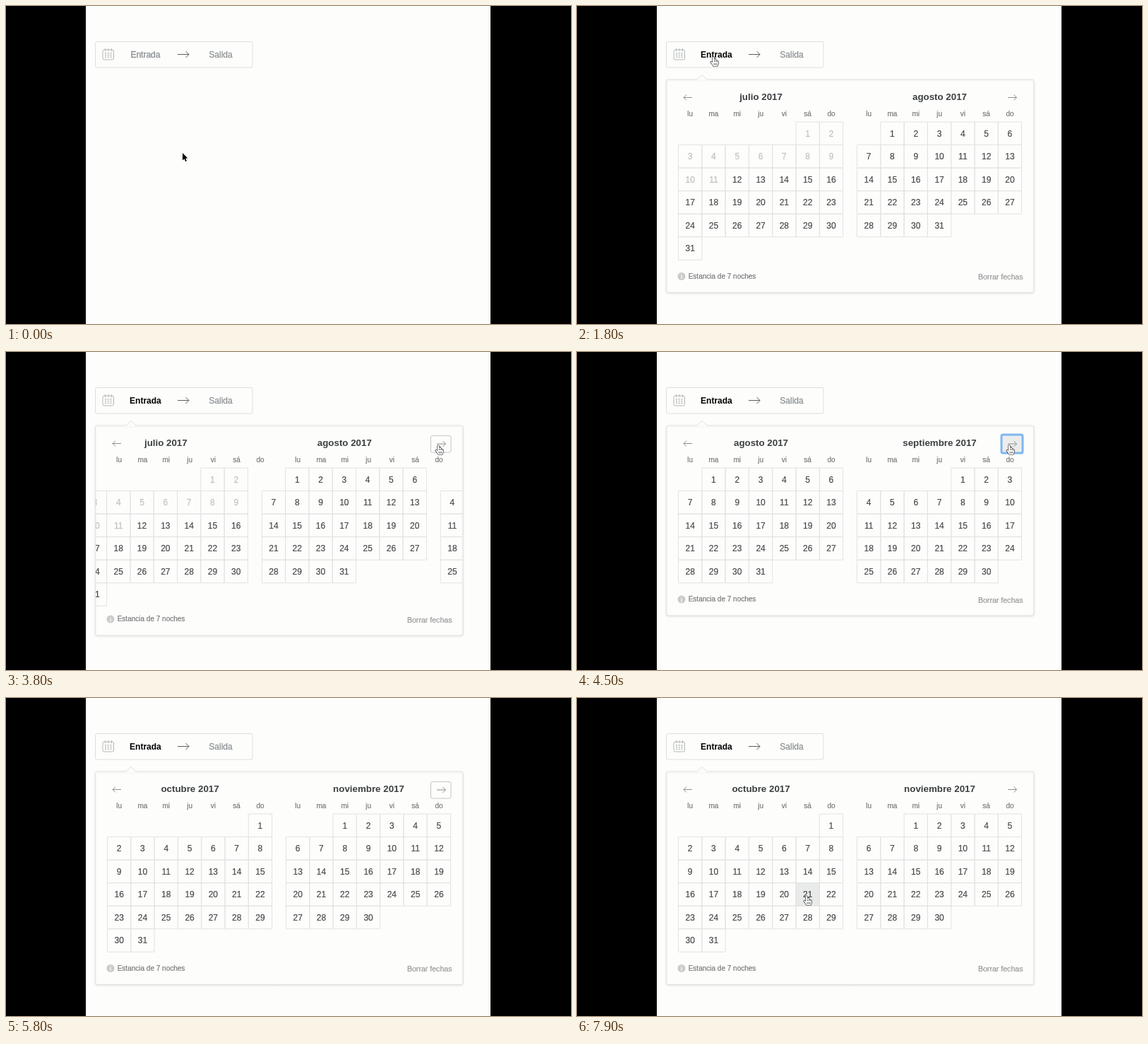
These frames come from a looping animation (800x450 px, 8000 ms). An HTML page with a canvas:

```html
<!DOCTYPE html>
<html lang="es">
<head>
<meta charset="utf-8">
<title>Selector de fechas</title>
<style>
html, body { margin: 0; width: 100%; height: 100%; overflow: hidden; background: #000; }
canvas { display: block; }
</style>
</head>
<body>
<canvas id="stage" width="800" height="450"></canvas>
<script>
const ctx = document.getElementById('stage').getContext('2d');
const LOOP = 8000, STEP = 100;
const PAPER = '#fdfefc', LINE = '#e1e3e2', INK = '#46494a';
const COL = 33.3, ROW = 32.55, TOP = 164, LEFT = 143.5, MONTH_GAP = 253;
const MONTHS = ['enero', 'febrero', 'marzo', 'abril', 'mayo', 'junio', 'julio',
  'agosto', 'septiembre', 'octubre', 'noviembre', 'diciembre'];
const WEEK = ['lu', 'ma', 'mi', 'ju', 'vi', 'sá', 'do'];
const TODAY = 12, FIRST = 6;
const CLICKS = [3700, 4500, 5400], SLIDES = [3740, 4540, 5540];

// Cursor paths: start, end, then three points of a quadratic curve.
const PATHS = [
  [0, 800, 250, 208, 150, 150, 193, 72],
  [1800, 2600, 193, 72, 330, 260, 560, 130],
  [2600, 3100, 560, 130, 590, 128, 612, 132],
  [6500, 7400, 612, 132, 400, 200, 226, 276],
  [7400, 7900, 226, 276, 270, 284, 325, 280]
];

const clamp = v => Math.max(0, Math.min(1, v));
const ease = v => { v = clamp(v); return v * v * (3 - 2 * v); };
const inBox = (p, x, y, w, h) => p.x >= x && p.x < x + w && p.y >= y && p.y < y + h;

function cursorAt(t) {
  const path = PATHS.filter(s => s[0] <= t).pop();
  const [a, b, x0, y0, cx, cy, x1, y1] = path;
  const p = ease((t - a) / (b - a)), q = 1 - p;
  const mix = (u, v, w) => u * q * q + 2 * v * p * q + w * p * p;
  return { x: mix(x0, cx, x1), y: mix(y0, cy, y1) };
}

function text(str, x, y, size, color, { bold = false, align = 'center', weight = 0.2 } = {}) {
  ctx.font = `${bold ? 'bold ' : ''}${size}px "Liberation Sans", Arial, sans-serif`;
  ctx.textAlign = align;
  ctx.fillStyle = ctx.strokeStyle = color;
  ctx.fillText(str, x, y);
  if (!bold && weight) {
    ctx.lineWidth = weight;
    ctx.strokeText(str, x, y);
  }
}

function box(x, y, w, h, r, fill, stroke, width = 1) {
  ctx.beginPath();
  ctx.roundRect(x, y, w, h, r);
  if (fill) { ctx.fillStyle = fill; ctx.fill(); }
  if (stroke) { ctx.strokeStyle = stroke; ctx.lineWidth = width; ctx.stroke(); }
}

function polyline(points, color, width = 1) {
  ctx.beginPath();
  points.forEach(([x, y]) => ctx.lineTo(x, y));
  ctx.strokeStyle = color;
  ctx.lineWidth = width;
  ctx.stroke();
}

function arrow(from, to, y, head, color) {
  const back = to - Math.sign(to - from) * head;
  polyline([[from, y], [to, y]], color);
  polyline([[back, y - head], [to, y], [back, y + head]], color);
}

function drawInput(open) {
  box(126.5, 50.5, 222.5, 36.5, 2, null, '#dcdedd');
  box(137, 62, 15.5, 14, 2, null, '#b4b7b6');
  ctx.fillStyle = '#b4b7b6';
  for (let i = 0; i < 3; i++) {
    ctx.fillRect(140 + i * 4.5, 60, 1, 4);
    for (let j = 0; j < 3; j++) ctx.fillRect(140 + i * 3.7, 66 + j * 2.8, 2, 1.5);
  }
  text('Entrada', 197.4, 72.5, 12, open ? '#000' : '#8b8f91', { bold: open, weight: 0.35 });
  text('Salida', 304, 72.5, 12, '#8f9395', { weight: 0.3 });
  arrow(243, 259, 68.5, 4.5, '#5c5f60');
}

function monthInfo(m) {
  const lead = (new Date(2017, m, 1).getDay() + 6) % 7;
  const days = new Date(2017, m + 1, 0).getDate();
  return { lead, days, rows: Math.ceil((lead + days) / 7) };
}

const bottomFor = m =>
  Math.max(monthInfo(m).rows, monthInfo(m + 1).rows) > 5 ? 405.5 : 373;

function eachDay(m, x, visit) {
  const { lead, days } = monthInfo(m);
  for (let d = 1; d <= days; d++) {
    const i = lead + d - 1;
    visit(d, x + (i % 7) * COL, TOP + Math.floor(i / 7) * ROW, m === 6 && d < TODAY);
  }
}

function drawMonth(m, x, pointer) {
  text(`${MONTHS[m]} 2017`, x + 117, 132.5, 13.33, '#3c3f40', { bold: true });
  eachDay(m, x, (d, cx, cy, past) => {
    const hot = !past && pointer && inBox(pointer, cx, cy, COL, ROW);
    box(cx, cy, COL, ROW, 0, hot ? '#e9ebea' : null, LINE);
    text(d, cx + COL / 2, cy + 20.6, 12, past ? '#c4c7c6' : INK, { weight: past ? 0.35 : 0.2 });
  });
}

function drawPanel(view, pointer, pressed, overNext) {
  const m = Math.floor(view), part = view - m;
  const bottom = bottomFor(m) + (bottomFor(m + 1) - bottomFor(m)) * part;

  ctx.save();
  ctx.shadowColor = 'rgba(0,0,0,.10)';
  ctx.shadowBlur = 3;
  ctx.shadowOffsetY = 1;
  box(126.5, 104, 520.5, bottom - 104, 3, PAPER, '#e2e4e3');
  ctx.restore();
  ctx.fillStyle = PAPER;
  ctx.fillRect(170.5, 103, 13, 2);
  polyline([[170, 104], [177, 97.5], [184, 104]], '#dfe1e0');

  ctx.save();
  ctx.beginPath();
  ctx.rect(127, 105, 519.5, bottom - 105);
  ctx.clip();
  for (let i = m; i < m + 3; i++) {
    drawMonth(i, LEFT + MONTH_GAP * (i - view), part ? null : pointer);
  }
  ctx.restore();

  for (const x of [LEFT, LEFT + MONTH_GAP]) {
    WEEK.forEach((w, i) => text(w, x + (i + 0.5) * COL, 155.5, 10, '#757877'));
  }

  arrow(163, 151, 129.5, 4, '#8c8f8e');
  if (pressed) {
    box(601, 117, 30, 26, 2, '#ebedec', '#80b6f2', 3);
  } else if (overNext) {
    box(601.5, 118.5, 28.5, 23.5, 2, null, '#c3c6c5');
  }
  arrow(610, 622.5, overNext ? 130 : 129.5, 4, '#8c8f8e');

  const dy = bottom - 405.5;
  ctx.beginPath();
  ctx.arc(148, 382.5 + dy, 5.5, 0, 7);
  ctx.fillStyle = '#c9cccb';
  ctx.fill();
  text('i', 148, 386 + dy, 9, PAPER, { bold: true });
  text('Estancia de 7 noches', 157.7, 385.7 + dy, 10, '#757877', { align: 'left' });
  text('Borrar fechas', 631.5, 387 + dy, 10.6, '#949796', { align: 'right' });
}

function drawCursor({ x, y }, hand) {
  const shape = new Path2D(hand
    ? 'M-1.5 1Q0-.8 1.2 1L1.7 5Q3-.2 3.9 5Q5.4 4.4 5.7 6Q7.3 5.6 7.4 7.4Q7.5 10 6 13H-.2Q-1.8 10-3.9 7.6Q-3.9 5.8-2 7L-.7 8Z'
    : 'M0 0V10.4L2.4 8.2 4.1 12 5.9 11.2 4.2 7.5H7.4Z');
  ctx.save();
  ctx.translate(x, y);
  ctx.lineJoin = 'round';
  ctx.lineWidth = hand ? 1.1 : 1.6;
  ctx.strokeStyle = hand ? '#111' : '#fff';
  ctx.fillStyle = hand ? '#fff' : '#000';
  ctx.stroke(shape);
  ctx.fill(shape);
  if (hand) {
    ctx.lineWidth = 0.7;
    ctx.stroke(new Path2D('M1.7 5V7M3.9 5V7M5.7 6V7.5M1 9V11.5M3 9V11.5M5 9V11.5'));
  }
  ctx.restore();
}

function draw(t) {
  const open = t >= 1300;
  const cursor = cursorAt(t);
  const view = FIRST + SLIDES.reduce((sum, s) => sum + ease((t - s) / 260), 0);
  const overNext = open && inBox(cursor, 601, 118, 30, 25);
  const pressed = CLICKS.some(c => t >= c && t < c + STEP);
  const hidden = t >= 4600 && t < 6600;

  ctx.fillStyle = '#000';
  ctx.fillRect(0, 0, 800, 450);
  ctx.fillStyle = PAPER;
  ctx.fillRect(113, 0, 573, 450);
  drawInput(open);
  if (open) drawPanel(view, cursor, pressed, overNext);

  if (hidden) return;
  let hand = overNext || inBox(cursor, 126, 50, 223, 37);
  if (open) {
    const m = Math.floor(view);
    for (let i = 0; i < 2; i++) {
      eachDay(m + i, LEFT + MONTH_GAP * i, (d, x, y, past) => {
        if (!past && inBox(cursor, x, y, COL, ROW)) hand = true;
      });
    }
  }
  drawCursor(cursor, hand);
}

const start = performance.now();
function tick() {
  const t = (performance.now() - start) % LOOP;
  draw(Math.floor(t / STEP) * STEP);
  requestAnimationFrame(tick);
}
tick();
</script>
</body>
</html>
```
